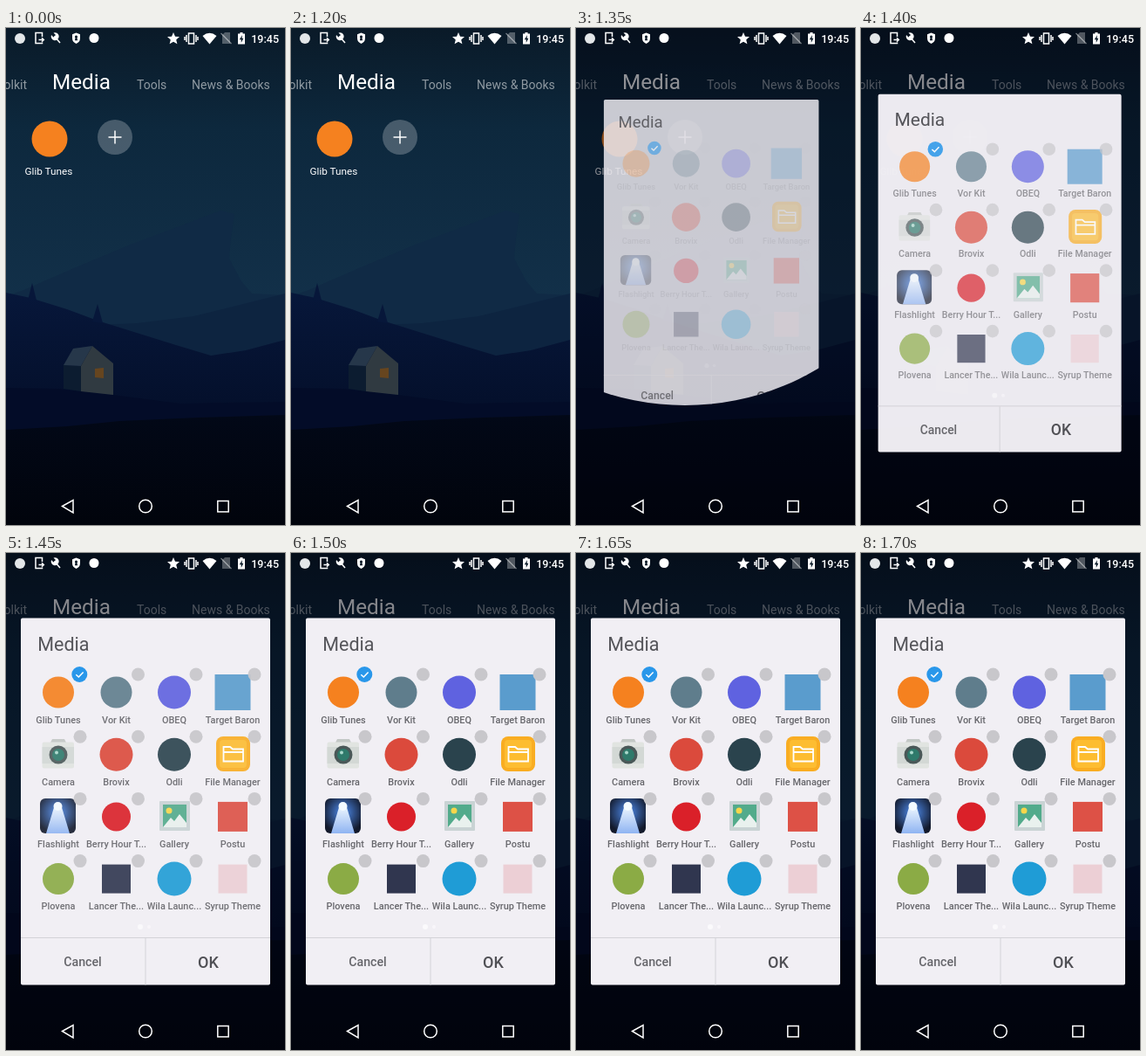
Animation, 320 px wide and 569 px high, one loop 3100 ms. Source, as an HTML page:

```html
<!DOCTYPE html>
<html lang="en">
<head>
<meta charset="utf-8">
<title>App picker</title>
<style>
  html, body { margin: 0; width: 100%; height: 100%; overflow: hidden; background: #01040c; }
  svg { display: block; width: 100vw; height: 100vh; }
  text { font-family: Roboto, "Open Sans", sans-serif; }
  .mid { text-anchor: middle; }
  .tab { font-size: 14px; fill: #fff; fill-opacity: .54; }
  .label { font-size: 10.9px; font-weight: 500; fill: #66666b; text-anchor: middle; }
  .line { fill: none; stroke: #fff; stroke-width: 1.5; }
</style>
</head>
<body>
<svg viewBox="0 0 320 569">
  <defs>
    <linearGradient id="sky" x1="0" y1="0" x2="0" y2="1">
      <stop offset="0" stop-color="#0a1a28"/>
      <stop offset=".2" stop-color="#0d283d"/>
      <stop offset=".55" stop-color="#123049"/>
      <stop offset="1" stop-color="#123049"/>
    </linearGradient>
    <linearGradient id="hill" x1="0" y1="0" x2="0" y2="1">
      <stop offset="0" stop-color="#07173a"/>
      <stop offset="1" stop-color="#030d26"/>
    </linearGradient>
    <linearGradient id="ground" x1="0" y1="0" x2="0" y2="1">
      <stop offset="0" stop-color="#020817"/>
      <stop offset="1" stop-color="#01040c"/>
    </linearGradient>
    <linearGradient id="beam" x1="0" y1="0" x2="0" y2="1">
      <stop offset="0" stop-color="#f4fbff"/>
      <stop offset="1" stop-color="#8fb4f2"/>
    </linearGradient>
    <radialGradient id="glow" cx=".5" cy=".4" r=".6">
      <stop offset="0" stop-color="#4f8df0"/>
      <stop offset="1" stop-color="#131a2c"/>
    </radialGradient>
    <clipPath id="reveal"><circle id="iris" cx="125" cy="134" r="0"/></clipPath>
  </defs>

  <!-- wallpaper -->
  <rect width="320" height="569" fill="url(#sky)"/>
  <path d="M0 307L20 300L80 274L140 249L180 234L246 209L262 213L258 240L256 264L270 290L282 304L320 306V400H0Z" fill="#102a45"/>
  <path d="M100 340L150 338L215 330L252 321L320 304V420H100Z" fill="#0d2440"/>
  <path d="M0 303L28 309L70 322L105 335L150 349L195 363L235 375L275 369L320 357V480H0Z" fill="url(#hill)"/>
  <path d="M25 312L30 292L35 312ZM99 336L105 316L111 338Z" fill="#07173a"/>
  <path d="M0 412L60 413L130 421L200 430L320 428V480H0Z" fill="#030c28"/>
  <path d="M66 386L86 387V416L66 413Z" fill="#0c1c30"/>
  <path d="M66 386L77 367L99 364L86 387Z" fill="#26374a"/>
  <path d="M86 387L99 364L123 384V420L86 416Z" fill="#303a41"/>
  <path d="M102 390L112 389V401L102 400Z" fill="#66451f"/>
  <path d="M0 460L70 456L130 450L220 446L320 443V569H0Z" fill="url(#ground)"/>

  <!-- home screen -->
  <text class="tab" x="24" y="70" text-anchor="end">Toolkit</text>
  <text x="53" y="69.5" font-size="24.3" fill="#fff">Media</text>
  <text class="tab" x="150" y="70">Tools</text>
  <text class="tab" x="213" y="70">News &amp; Books</text>
  <circle cx="50" cy="127" r="20.5" fill="#f5811f"/>
  <text class="mid" x="49" y="168" font-size="11.8" fill="#fff">Glib Tunes</text>
  <circle cx="125" cy="125" r="20" fill="#fff" fill-opacity=".24"/>
  <path class="line" d="M117.5 125H132.5M125 117.5V132.5"/>
  <rect id="dim" width="320" height="569" fill="#01040e" opacity="0"/>

  <!-- dialog -->
  <g clip-path="url(#reveal)">
    <g id="dialog">
      <rect id="panel" x="17" y="74.5" width="286" height="420" rx="2" fill="#f1eff4"/>
      <g id="frame">
        <text x="36.3" y="112" font-size="21.5" fill="#55555a">Media</text>
        <path d="M17 440.5H303M160 441V494.5" stroke="#d3d2d7" fill="none"/>
        <text class="mid" x="88" y="473" font-size="14.2" font-weight="500" fill="#66666b">Cancel</text>
        <text class="mid" x="232" y="474.5" font-size="18" font-weight="500" fill="#505055">OK</text>
      </g>
      <g id="icons">
        <g id="marks"></g>
        <!-- camera -->
        <path d="M51 217L53 213H67L69 217Z" fill="#c3c8c5"/>
        <rect x="41.5" y="216.5" width="36.5" height="30" rx="2" fill="#e1e4e1"/>
        <rect x="41.5" y="222" width="36.5" height="19" fill="#d3d8d5"/>
        <circle cx="60" cy="231" r="10.5" fill="#4a5858"/>
        <circle cx="60" cy="231" r="7" fill="#2f7a6b"/>
        <circle cx="58" cy="228.5" r="2" fill="#a8d8cb"/>
        <!-- folder -->
        <rect x="241" y="210" width="39" height="40" rx="8" fill="#f9ad22"/>
        <rect x="245" y="214" width="31" height="32" rx="4" fill="#fdbd31"/>
        <path d="M249.500 238.500V222H257L260 224.500H272V238.500ZM249.500 228H272" fill="none" stroke="#fff" stroke-width="1.800"/>
        <!-- flashlight -->
        <rect x="39" y="281" width="41" height="40" rx="6" fill="url(#glow)"/>
        <path d="M56 288H63L73 321H46Z" fill="url(#beam)"/>
        <circle cx="59.500" cy="290" r="5" fill="#f4fbff"/>
        <!-- gallery -->
        <rect x="176" y="284" width="35" height="34" rx="1" fill="#c9d3d4"/>
        <rect x="180" y="288" width="27" height="26" fill="#52ab8b"/>
        <circle cx="187" cy="295" r="3.500" fill="#f7d64a"/>
        <path d="M180 314L189 303L193 307L199 299L207 309V314Z" fill="#e9f1ee"/>
      </g>
      <g id="labels">
        <circle cx="154" cy="428" r="3" fill="#fbfafc"/>
        <circle cx="164" cy="428" r="2" fill="#f8f6fa"/>
      </g>
      <g id="check">
        <circle cx="84.300" cy="139" r="9" fill="#2997ea"/>
        <path class="line" d="M80.300 139.200L83.300 142L88.600 136.400"/>
      </g>
    </g>
  </g>

  <!-- status bar -->
  <g fill="#fff">
    <circle cx="16" cy="12" r="6" fill="#e3e6e8"/>
    <path class="line" d="M41.500 10V5.500H34V17.500H41.500V16.500M37.500 13.500H43M41 11.300L43.300 13.500L41 15.700" stroke-width="1.300"/>
    <path class="line" d="M55.500 9.500L62 17" stroke-width="3"/>
    <path d="M52 8L54.500 10.500L57 8L54.500 5.500A4.500 4.500 0 1 1 52 8Z"/>
    <path d="M80.500 5.500L85 7.300V11.500Q85 16 80.500 18Q76 16 76 11.500V7.300Z"/>
    <path d="M80.500 8.500a1.600 1.600 0 0 1 1 2.800l.6 3h-3.200l.6-3a1.600 1.600 0 0 1 1-2.800Z" fill="#0b1b29"/>
    <circle cx="101" cy="11.500" r="5.500"/>
    <path d="M192 5L194 9.700L199 10.100L195.200 13.400L196.400 18.300L192 15.700L187.600 18.300L188.800 13.400L185 10.100L190 9.700Z"/>
    <path class="line" d="M209.500 6H215.500V18H209.500ZM207 8V16M218 8V16M205 10V14M220 10V14"/>
    <path d="M225.500 9Q233.500 2.500 241.500 9L233.500 18.500Z"/>
    <path d="M248 8L251 5H257V18H248Z" fill-opacity=".3"/>
    <path d="M246.500 6L258.500 18" stroke="#fff" stroke-opacity=".45" stroke-width="1.300"/>
    <path d="M266 6.500H268.500V5H271.500V6.500H274V18.500H266Z"/>
    <path d="M271 8L267.800 13.200H269.700V17L272.400 11.800H270.500Z" fill="#0b1b29"/>
    <text x="313" y="16.500" text-anchor="end" font-size="12.500" font-weight="500">19:45</text>
  </g>

  <!-- navigation bar -->
  <g class="line">
    <path d="M64.500 547.500L77 540.500V555Z"/>
    <circle cx="160" cy="547.500" r="7.300"/>
    <rect x="242.800" y="541.500" width="12.400" height="12.400"/>
  </g>
</svg>

<script>
const $ = id => document.getElementById(id);
const make = (parent, tag, attrs, text = '') => {
  const el = document.createElementNS('http://www.w3.org/2000/svg', tag);
  for (const key in attrs) el.setAttribute(key, attrs[key]);
  el.textContent = text;
  parent.append(el);
};

// name, plain mark: shape, colour, half size
const apps = [
  ['Glib Tunes', 'circle', '#f5811f', 18], ['Vor Kit', 'circle', '#5f7d8c', 18],
  ['OBEQ', 'circle', '#5f62e0', 19], ['Target Baron', 'rect', '#5a9ccd', 20.5],
  ['Camera'], ['Brovix', 'circle', '#db4a3c', 19],
  ['Odli', 'circle', '#2a434d', 19], ['File Manager'],
  ['Flashlight'], ['Berry Hour T...', 'circle', '#da2029', 16.5],
  ['Gallery'], ['Postu', 'rect', '#dd5146', 17],
  ['Plovena', 'circle', '#8bab45', 18], ['Lancer The...', 'rect', '#30364f', 16.5],
  ['Wila Launc...', 'circle', '#1f9cd6', 19.5], ['Syrup Theme', 'rect', '#eccfd5', 16.5]
];
const colX = [60, 126.5, 193, 260];

apps.forEach(([name, shape, fill, h], i) => {
  const x = colX[i % 4], y = 159.5 + 71.2 * Math.floor(i / 4);
  if (shape === 'circle') make($('marks'), shape, { cx: x, cy: y, r: h, fill });
  if (shape === 'rect') make($('marks'), shape, { x: x - h, y: y - h, width: 2 * h, height: 2 * h, fill });
  if (i) make($('labels'), 'circle', { cx: x + 25, cy: y - 20.5, r: 7.5, fill: '#c8c7cb' });
  make($('labels'), 'text', { class: 'label', x, y: y + 35 }, name);
});

// ms, dim, reveal radius, scale, then opacity of panel, frame, icons, labels, check
const steps = [
  [0, 0, 0, .3, 0, 0, 0, 0, 0],
  [1250, .15, 45, .35, .3, .3, .05, 0, .1],
  [1300, .32, 155, .65, .62, .6, .12, .05, .3],
  [1350, .44, 298, .862, .83, .9, .25, .12, .55],
  [1400, .47, 480, .9755, .98, 1, .68, .65, .85],
  [1450, .48, 600, 1, 1, 1, .9, .92, 1],
  [1500, .48, 600, 1, 1, 1, 1, 1, 1]
];
const parts = ['panel', 'frame', 'icons', 'labels', 'check'];
const loop = 3100, start = performance.now();

function draw() {
  const t = (performance.now() - start) % loop;
  const [, dim, radius, scale, ...alpha] = steps.filter(s => s[0] <= t).pop();
  $('dim').setAttribute('opacity', dim);
  $('iris').setAttribute('r', radius);
  $('dialog').setAttribute('transform', `translate(125 128) scale(${scale}) translate(-125 -128)`);
  parts.forEach((id, i) => $(id).setAttribute('opacity', alpha[i]));
  requestAnimationFrame(draw);
}
draw();
</script>
</body>
</html>
```
